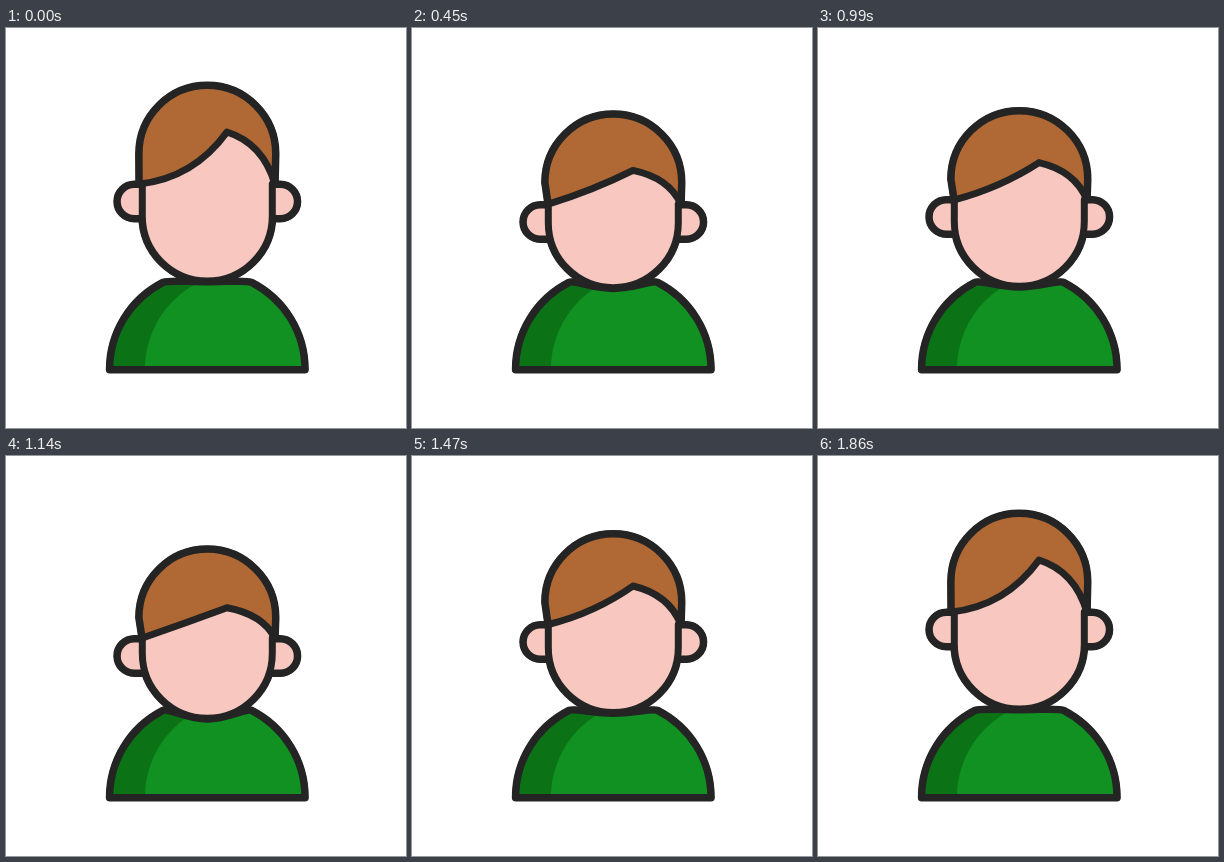
These frames come from a looping animation (400 px wide and 400 px high, 4070 ms). An HTML page with a canvas:

```html
<!DOCTYPE html>
<html lang="en">
<head>
<meta charset="utf-8">
<title>Nodding avatar</title>
<style>
html, body { margin: 0; width: 100%; height: 100%; overflow: hidden; background: #fff; }
canvas { display: block; width: 100vw; height: 100vh; }
</style>
</head>
<body>
<canvas id="stage" width="400" height="400"></canvas>
<script>
const ctx = document.getElementById('stage').getContext('2d');
const LOOP = 4070, STEP = 30, CX = 201.3, BASE = 341.5;
const INK = '#242424', SKIN = '#f8c8c0', HAIR = '#b06935';
const GREEN = '#109121', SHADE = '#0b7316';

// Heights of hair top, parting, hair end, ear centre and chin; then the hair end's distance from the axis
const rest = [57.5, 104, 156, 173.5, 253, 68];
const up = [54.5, 95, 147, 163.5, 247.3, 65];
const down = [101.5, 165, 190, 208.5, 265.5, 65];
const half = [82.5, 134, 171.5, 188.5, 258, 65];
const keys = [[0, rest], [210, up], [600, down], [960, half], [1290, down], [1650, up], [1860, rest]];

const ease = u => (1 - Math.cos(Math.PI * u)) / 2;

function poseAt(t) {
  const i = keys.findIndex(k => k[0] > t);
  if (i < 0) return rest;
  const [t0, a] = keys[i - 1], [t1, b] = keys[i];
  const u = ease((t - t0) / (t1 - t0));
  return a.map((v, n) => v + (b[n] - v) * u);
}

function paint(path, fill) {
  ctx.fillStyle = fill;
  ctx.fill(path);
  ctx.stroke(path);
}

// Round shoulders, with a collar that follows the chin
function drawBody(neck) {
  const r = 97.5, a = 1.1;
  const dx = r * Math.cos(a), y = BASE - r * Math.sin(a);
  const body = new Path2D();
  body.arc(CX, BASE, r, Math.PI, Math.PI + a);
  body.bezierCurveTo(CX - dx + 5, y - 2.5, CX - 20, neck, CX, neck);
  body.bezierCurveTo(CX + 20, neck, CX + dx - 5, y - 2.5, CX + dx, y);
  body.arc(CX, BASE, r, -a, 0);
  body.closePath();

  const light = new Path2D();
  light.arc(CX + 35, BASE, r, Math.PI, Math.PI * 2);

  ctx.fillStyle = SHADE;
  ctx.fill(body);
  ctx.save();
  ctx.clip(body);
  ctx.fillStyle = GREEN;
  ctx.fill(light);
  ctx.restore();
  ctx.stroke(body);
}

function drawEar(side, y) {
  const p = new Path2D(), x = CX + side * 73;
  p.moveTo(CX + side * 65, y - 17);
  p.lineTo(x, y - 17);
  p.arc(x, y, 17, -Math.PI / 2, Math.PI / 2, side < 0);
  p.lineTo(CX + side * 65, y + 17);
  paint(p, SKIN);
}

function drawFace(part, end, chin) {
  const p = new Path2D(), r = 65;
  p.moveTo(CX + r, end);
  p.arc(CX, chin - r, r, 0, Math.PI);
  p.lineTo(CX - r, end);
  ctx.fillStyle = SKIN;
  ctx.fillRect(CX - r, part, r * 2, end - part + 5);
  paint(p, SKIN);
}

function drawHair(top, part, end, reach) {
  const px = 221, r = 68.2, left = CX - reach, h = end - part;
  const bend = (h - 30) * 0.92;
  const p = new Path2D();
  p.moveTo(left, end);
  p.arc(CX, top + r, r, Math.PI, Math.PI * 2);
  p.lineTo(CX + 67.5, end);
  p.quadraticCurveTo(257, part + h * 0.22, px, part);
  p.quadraticCurveTo((left + px) / 2 + bend / 2, (part + end) / 2 + bend, left, end);
  p.closePath();
  paint(p, HAIR);
}

function drawFigure([top, part, end, ear, chin, reach], weight) {
  ctx.lineWidth = weight;
  drawBody(chin + 1);
  drawEar(-1, ear);
  drawEar(1, ear);
  drawFace(part, end, chin);
  drawHair(top, part, end, reach);
}

function draw(t) {
  const pose = poseAt(t);
  ctx.fillStyle = '#fff';
  ctx.fillRect(0, 0, 400, 400);
  ctx.strokeStyle = INK;
  ctx.lineJoin = ctx.lineCap = 'round';
  // The first pass leaves a slightly heavier outer contour
  drawFigure(pose, 8);
  drawFigure(pose, 7);
}

const start = performance.now();
function tick() {
  const t = (performance.now() - start) % LOOP;
  draw(Math.floor(t / STEP) * STEP);
  requestAnimationFrame(tick);
}
tick();
</script>
</body>
</html>
```
